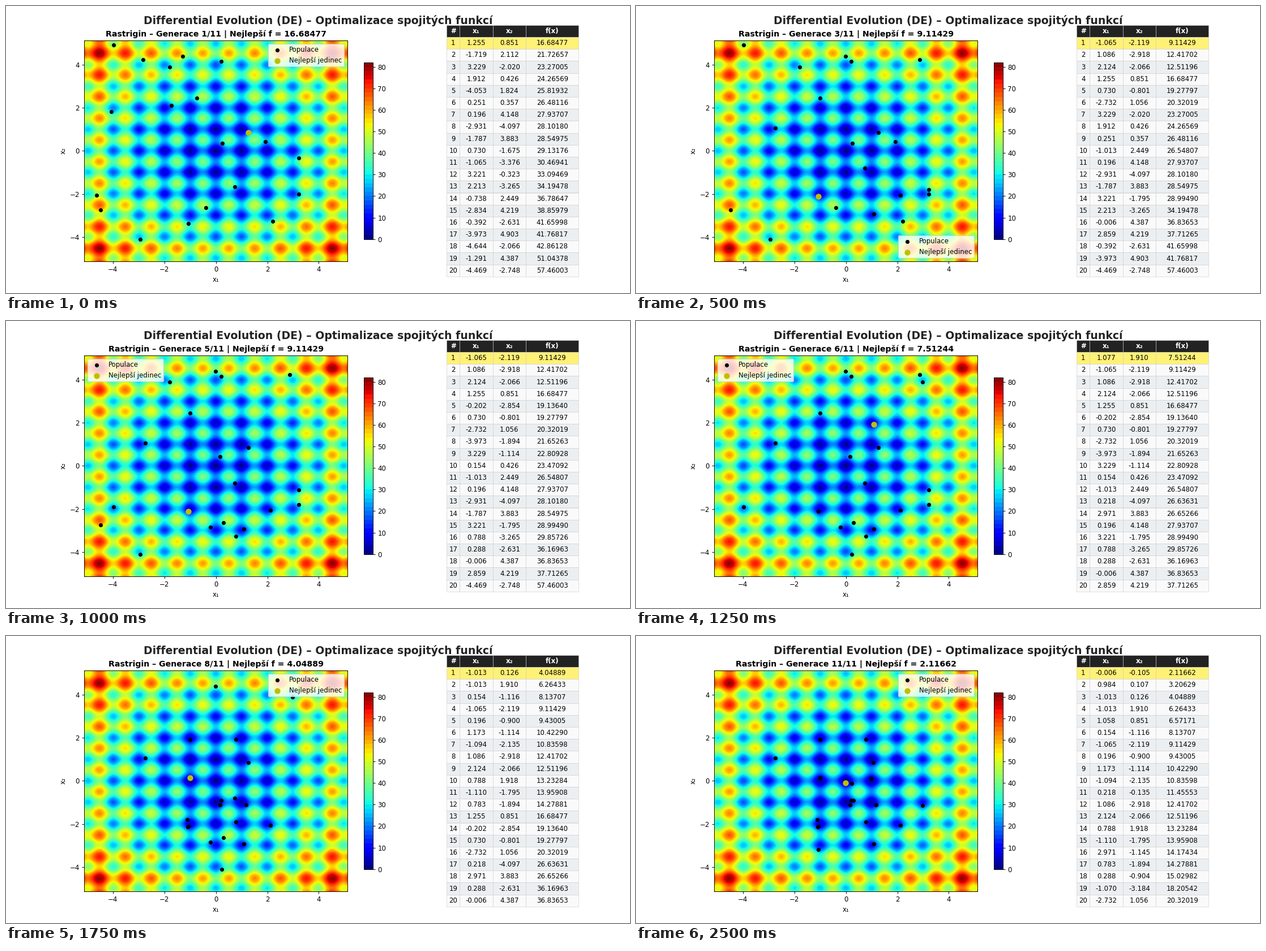
Write a matplotlib script that moves like this. It is 1102 by 508 pixels and loops after 2.75 s.

```python
import numpy as np
import matplotlib.pyplot as plt
from matplotlib.animation import FuncAnimation

W, H, DPI = 1102, 508, 85
STEP_MS = 250
COUNT = 11
LIMIT = 5.12


def wave(x):
    return 10 + x**2 - 10 * np.cos(2 * np.pi * x)


def cost(p):
    """Rastrigin function."""
    return wave(p[0]) + wave(p[1])


def crossover(a, b):
    """Swap one coordinate and keep the trial only if it beats its parent."""
    trial = max((a[0], b[1]), (b[0], a[1]), key=cost)
    return min(a, trial, key=cost)


# Key points of each individual: first, last and sometimes one between
PATHS = [
    [(-1.065, -3.376), (-1.065, -2.119)],
    [(-4.644, -2.066), (2.124, -2.066)],
    [(-1.719, 2.112), (1.086, -2.918)],
    [(-4.053, 1.824), (-2.732, 1.056)],
    [(-0.738, 2.449), (-1.013, 0.126)],
    [(-2.834, 4.219), (2.859, 4.219), (-1.094, -2.135)],
    [(-3.973, 4.903), (-3.973, -1.894), (0.783, -1.894)],
    [(3.229, -2.020), (1.173, -1.114)],
    [(-4.469, -2.748), (1.077, 1.910), (-1.013, 1.910)],
    [(0.196, 4.148), (0.196, -0.900)],
    [(3.221, -0.323), (-1.110, -1.795)],
    [(1.912, 0.426), (0.154, -1.116)],
    [(2.213, -3.265), (0.788, 1.918)],
    [(-1.787, 3.883), (2.971, -1.145)],
    [(1.255, 0.851), (1.058, 0.851)],
    [(-1.291, 4.387), (-0.006, -0.105)],
    [(0.251, 0.357), (-0.202, -2.854), (-1.070, -3.184)],
    [(-0.392, -2.631), (0.288, -0.904)],
    [(-2.931, -4.097), (0.218, -0.135)],
    [(0.730, -1.675), (0.730, -0.801), (0.984, 0.107)],
]
SIZE = len(PATHS)
# Generation in which each individual reaches its last point
SETTLED = np.repeat([2, 3, 7, 8, 9, 10, 11], [3, 1, 2, 7, 5, 1, 1])


def member(k, gen):
    path = PATHS[k]
    first, last = path[0], path[-1]
    if gen >= SETTLED[k]:
        return last
    if gen >= 2 + (k + 1) % 5:
        return path[1] if len(path) == 3 else crossover(first, last)
    return first


def px_axes(left, top, right, bottom):
    return fig.add_axes([left / W, 1 - bottom / H,
                         (right - left) / W, (bottom - top) / H])


plt.rcParams["font.family"] = "DejaVu Sans"
fig = plt.figure(figsize=(W / DPI, H / DPI), dpi=DPI)
fig.text(0.5, 1 - 32 / H,
         "Differential Evolution (DE) – Optimalizace spojitých funkcí",
         ha="center", va="baseline", fontsize=16, fontweight="bold",
         color="#222222")

# Landscape; the colour bar takes the right fifth of these axes
ax = px_axes(137.9, 60.8, 719.7, 451.8)
grid = np.linspace(-LIMIT, LIMIT, 200)
X, Y = np.meshgrid(grid, grid)
field = ax.contourf(X, Y, cost((X, Y)), levels=50, cmap="jet")
fig.colorbar(field, ax=ax, shrink=0.8)
ax.set_xlabel("x₁")
ax.set_ylabel("x₂")
title = ax.set_title("", fontsize=12, fontweight="bold")
dots = ax.scatter([0], [0], c="k", s=25, label="Populace", zorder=3)
best = ax.scatter([0], [0], c="y", s=60, label="Nejlepší jedinec", zorder=4)
ax.set_xlim(-LIMIT, LIMIT)
ax.set_ylim(-LIMIT, LIMIT)
ax.legend(loc="best", borderpad=0.35)

# Ranking table
tax = px_axes(778.1, 33.9, 1011.4, 478.8)
tax.axis("off")
table = tax.table(cellText=[[""] * 4 for _ in range(SIZE)],
                  colLabels=["#", "x₁", "x₂", "f(x)"],
                  colWidths=[0.10, 0.25, 0.25, 0.40],
                  cellLoc="center", bbox=[0, 0, 1, 1])
table.auto_set_font_size(False)
table.set_fontsize(10)
for (row, col), cell in table.get_celld().items():
    cell.set_edgecolor("#cccccc")
    cell.set_linewidth(0.5)
    if row == 0:
        cell.set_facecolor("#222222")
        cell.set_text_props(color="white", fontweight="bold")
    elif row == 1:
        cell.set_facecolor("#fff176")
    else:
        cell.set_facecolor("#eceff1" if row % 2 else "#fafafa")


def update(i):
    gen = i + 1
    pop = sorted((member(k, gen) for k in range(SIZE)), key=cost)
    dots.set_offsets(pop)
    best.set_offsets(pop[:1])
    title.set_text(f"Rastrigin – Generace {gen}/{COUNT} | "
                   f"Nejlepší f = {cost(pop[0]):.5f}")
    for row, p in enumerate(pop, 1):
        values = (str(row), f"{p[0]:.3f}", f"{p[1]:.3f}", f"{cost(p):.5f}")
        for col, text in enumerate(values):
            table[row, col].get_text().set_text(text)
    return dots, best, title, table


anim = FuncAnimation(fig, update, frames=COUNT, interval=STEP_MS,
                     init_func=lambda: update(0), repeat=True, repeat_delay=0)
plt.show()
```
